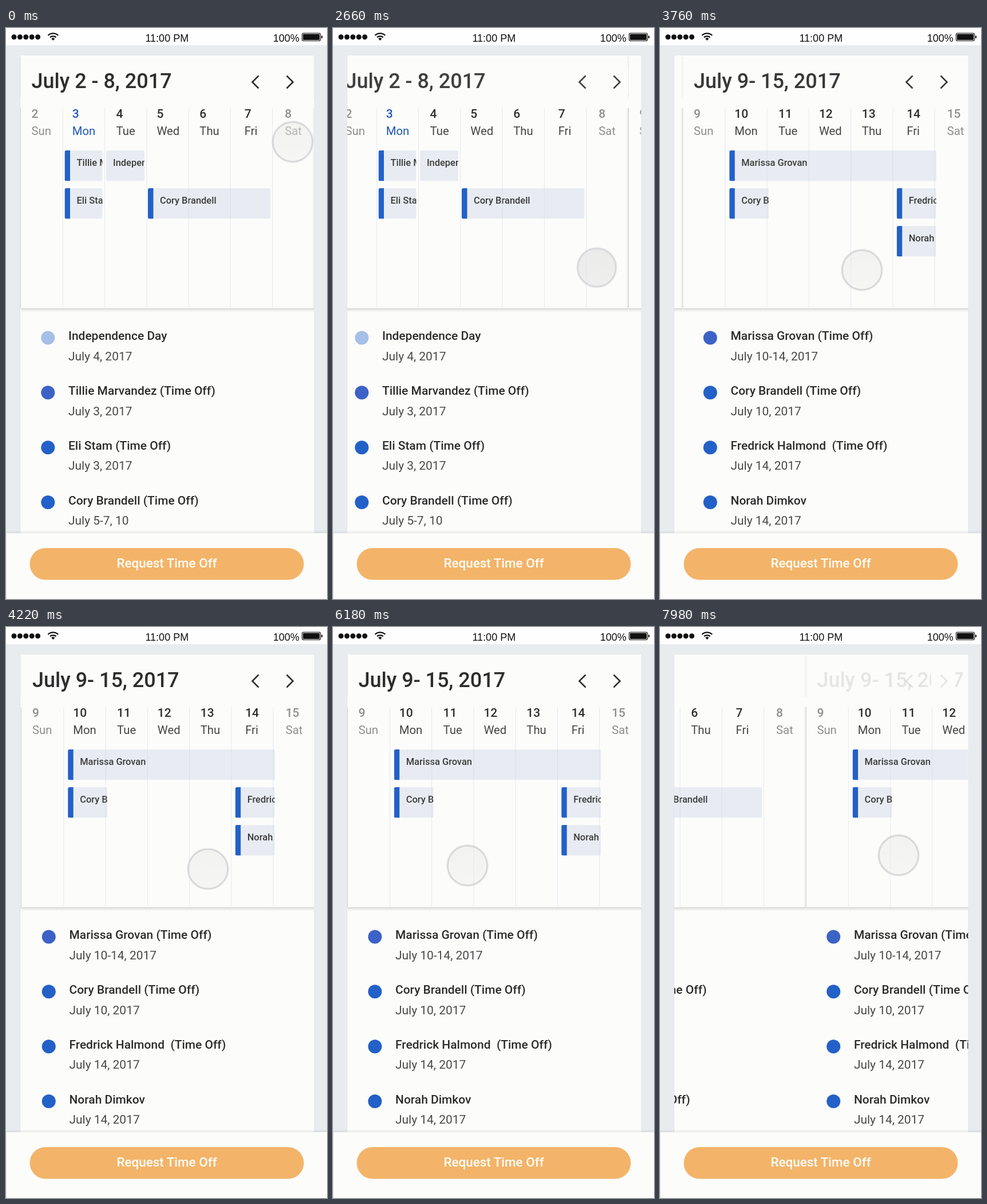
An HTML page for the animation above (8 s loop, 561 px wide and 998 px high).

```html
<!DOCTYPE html>
<html lang="en">
<head>
<meta charset="utf-8">
<title>Time off calendar</title>
<style>
  html, body { margin: 0; width: 100%; height: 100%; overflow: hidden; background: #e9ecee; }
  svg { display: block; width: 100%; height: 100%; }
  text { font-family: Roboto, sans-serif; white-space: pre; }
  .medium { font-weight: 500; }
  .status { font: 18px "Liberation Sans", sans-serif; fill: #111; }
</style>
</head>
<body>
<svg id="stage" viewBox="0 0 561 998" xmlns="http://www.w3.org/2000/svg"></svg>
<script>
const LOOP = 8000, PAGE = 514, SLACK = 20, FADE = 257, GLIDE = 224;
const BLUE = '#2360c8', PAPER = '#fcfcfb', INK = '#2d2d2d';

const dayNames = ['Sun', 'Mon', 'Tue', 'Wed', 'Thu', 'Fri', 'Sat'];
const dayX = [44.5, 115.8, 192.6, 263.4, 338.3, 416.7, 487.2];

// bars: x, width, row, label, striped; list: name, date, dot colour
const weeks = [
  {
    title: 'July 2 - 8, 2017', first: 2, today: 1,
    bars: [
      [102.5, 66, 0, 'Tillie Marvandez', true],
      [175, 67, 0, 'Independence Day', false],
      [102.5, 66, 1, 'Eli Stam', true],
      [248, 214.5, 1, 'Cory Brandell', true]
    ],
    list: [
      ['Independence Day', 'July 4, 2017', '#a6bfe6'],
      ['Tillie Marvandez (Time Off)', 'July 3, 2017', '#3d62c6'],
      ['Eli Stam (Time Off)', 'July 3, 2017', BLUE],
      ['Cory Brandell (Time Off)', 'July 5-7, 10', BLUE]
    ]
  },
  {
    title: 'July 9- 15, 2017', first: 9, today: -1,
    bars: [
      [106.7, 362, 0, 'Marissa Grovan', true],
      [106.7, 69, 1, 'Cory Brandell', true],
      [399.2, 69, 1, 'Fredrick Halmond', true],
      [399.2, 69, 2, 'Norah Dimkov', true]
    ],
    list: [
      ['Marissa Grovan (Time Off)', 'July 10-14, 2017', '#3d62c6'],
      ['Cory Brandell (Time Off)', 'July 10, 2017', BLUE],
      ['Fredrick Halmond  (Time Off)', 'July 14, 2017', BLUE],
      ['Norah Dimkov', 'July 14, 2017', BLUE]
    ]
  }
];

const rect = (x, y, w, h, fill, extra = '') =>
  `<rect x="${x}" y="${y}" width="${w}" height="${h}" fill="${fill}" ${extra}/>`;
const label = (x, y, size, fill, str, extra = '') =>
  `<text x="${x}" y="${y}" font-size="${size}" fill="${fill}" ${extra}>${str}</text>`;
const medium = 'class="medium"';

function dayHead(week, i) {
  const weekend = i % 6 === 0, today = i === week.today;
  const pick = normal => today ? '#2058b8' : weekend ? '#8e8e8e' : normal;
  return label(dayX[i], 157, 21, pick(INK), week.first + i, medium) +
    label(dayX[i], 187, 20.3, pick('#454545'), dayNames[i]);
}

function bar([x, w, row, name, striped], id) {
  const y = 214 + row * 66;
  return `<clipPath id="${id}">${rect(x, y, w, 53.5, '#000', 'rx="3"')}</clipPath>
    <g clip-path="url(#${id})">${rect(x, y, w, 53.5, '#e8ecf2')}
    ${striped ? rect(x, y, 9.5, 53.5, BLUE) : ''}
    ${label(x + (striped ? 21 : 12), y + 27.3, 16.45, '#3b3b3b', name, medium)}</g>`;
}

function entry([name, date, color], i) {
  const y = 541.5 + i * 95.85;
  return `<circle cx="73.3" cy="${y}" r="12" fill="${color}"/>` +
    label(109, y + 3.6, 20.95, '#2b2b2b', name, medium) +
    label(109, y + 39.2, 20.95, '#484848', date);
}

function page(week, n) {
  const lines = [1, 2, 3, 4, 5, 6].map(i =>
    rect(25.6 + i * 73.25, 140, 1, 349, '#c3cce2', 'opacity=".4"')).join('');
  return `<g id="page${n}">
    ${rect(21, 50, 5, 72, 'url(#side)', 'opacity=".4"')}
    ${rect(21, 140, 5, 350, 'url(#side)')}
    ${rect(26, 48, 513, 442, PAPER)}
    ${rect(26, 490, 513, 7, 'url(#under)')}
    ${label(44.5, 105, 36, INK, week.title, `${medium} id="title${n}"`)}
    ${week.bars.map((b, i) => bar(b, `bar${n}${i}`)).join('')}
    ${lines}
    ${dayNames.map((_, i) => dayHead(week, i)).join('')}
    ${week.list.map(entry).join('')}
  </g>`;
}

function fade(id, vertical, stops) {
  return `<linearGradient id="${id}" ${vertical ? 'x2="0" y2="1"' : ''}>` +
    stops.map(([at, color, a]) =>
      `<stop offset="${at}" stop-color="${color}" stop-opacity="${a}"/>`).join('') +
    '</linearGradient>';
}

const signal = [0, 1, 2, 3, 4].map(i =>
  `<circle cx="${14 + i * 10.4}" cy="15.8" r="4.5"/>`).join('');

const stage = document.getElementById('stage');
stage.innerHTML = `
  <defs>
    ${fade('side', false, [[0, '#000', 0], [.6, '#000', .05], [1, '#000', .2]])}
    ${fade('under', true, [[0, '#000', .19], [.35, '#000', .07], [1, '#000', 0]])}
    ${fade('lift', true, [[0, '#556', 0], [1, '#556', .12]])}
    ${fade('knob', true, [[0, '#e6e6e4', .45], [1, '#eeeeec', .45]])}
    <clipPath id="card">${rect(25, 48, 513.5, 836, '#000')}</clipPath>
  </defs>
  ${rect(0, 0, 561, 998, '#e9ecee')}
  ${rect(0, 0, 561, 30, '#fefefe')}
  <g fill="#111">${signal}
    <path d="M82.3 22l-3-3.3a4.4 4.4 0 0 1 6 0z"/>
    <g fill="none" stroke="#111" stroke-width="2.3">
      <path d="M77 16.4a8 8 0 0 1 10.6 0M73.4 12.9a13 13 0 0 1 17.8 0"/>
    </g>
    ${rect(517.5, 9, 32, 13.5, 'none', 'rx="2.5" stroke="#111" stroke-width="1.2"')}
    ${rect(519, 10.5, 29, 10.5, '#111', 'rx="1.2"')}
    <path d="M551 13q2.4 .6 2.4 2.8t-2.4 2.8z"/>
  </g>
  <text class="status" x="281.3" y="24" text-anchor="middle">11:00 PM</text>
  <text class="status" x="512.8" y="24" text-anchor="end">100%</text>
  ${rect(24.5, 47.5, 514.5, 840, PAPER, 'stroke="#e3e6ea"')}
  <g clip-path="url(#card)">
    ${weeks.map(page).join('')}
    ${rect(474, 71, 42, 44, PAPER)}
    <path id="arrows" d="M441.5 83.5L430.5 94.5L441.5 105.5M490.5 83.5L501.5 94.5L490.5 105.5"
      fill="none" stroke="${INK}" stroke-width="2.6"/>
  </g>
  ${rect(0, 878, 561, 5, 'url(#lift)')}
  ${rect(0, 883, 561, 115, PAPER)}
  ${rect(0, 883, 1, 115, '#e3e5e9')}
  ${rect(41.5, 909, 479, 55.5, '#f3b469', 'rx="27.7"')}
  ${label(281, 943, 22.44, '#fffdf8', 'Request Time Off', `${medium} text-anchor="middle"`)}
  <g id="touch">
    <circle r="35.4" fill="none" stroke="#667" stroke-opacity=".12" stroke-width="3"/>
    <circle r="34.3" fill="url(#knob)" stroke="#d6d6d9" stroke-width="2.2"/>
    <circle id="shade" r="33" fill="#99a"/>
  </g>`;

const $ = id => document.getElementById(id);
const clamp = v => Math.max(0, Math.min(1, v));
const ease = p => (1 - Math.cos(Math.PI * clamp(p))) / 2;
const mix = (a, b, p) => a + (b - a) * p;

// Finger moves: start, end, target x, target y
const moves = [
  [0, 800, 504, 417],
  [2470, 3000, 353, 423],
  [5000, 5760, 235, 417],
  [7440, 7932, 417, 399]
];
const drags = [moves[1], moves[3]];

function finger(t) {
  return moves.reduce(([x, y], [a, b, tx, ty]) => {
    const p = ease((t - a) / (b - a));
    return [mix(x, tx, p), mix(y, ty, p)];
  }, [501, 199]);
}

// The page follows the finger past a small slack, then glides to the next stop
function scroll(t) {
  const i = t >= drags[1][0] ? 1 : t >= drags[0][0] ? 0 : -1;
  if (i < 0) return 0;
  const [start, end] = drags[i];
  const from = i ? -PAGE : 0, to = -PAGE - from;
  const dx = finger(Math.min(t, end))[0] - finger(start)[0];
  const held = from + Math.sign(dx) * Math.max(0, Math.abs(dx) - SLACK);
  return t < end ? held : to + (held - to) * Math.exp((end - t) / GLIDE);
}

// Three even steps per 140 ms, shown for 20, 100 and 20 ms
function stepTime(t) {
  const phase = t % 140;
  const step = phase < 20 ? 0 : phase < 120 ? 1 : 2;
  return t - phase + step * 140 / 3;
}

function draw(time) {
  const t = stepTime(time), s = scroll(t);
  let strongest = 0;
  weeks.forEach((_, n) => {
    const x = s + n * PAGE, alpha = clamp(1 - Math.abs(x) / FADE);
    strongest = Math.max(strongest, alpha);
    $('page' + n).setAttribute('transform', `translate(${x.toFixed(2)} 0)`);
    $('title' + n).setAttribute('opacity', alpha);
  });
  $('arrows').setAttribute('opacity', strongest);

  const [x, y] = finger(t);
  const press = Math.max(...drags.map(([a, b]) =>
    Math.min(clamp((t - a + 60) / 120), clamp((b - t) / 100))));
  $('touch').setAttribute('transform', `translate(${x} ${y}) scale(${1 - .035 * press})`);
  $('shade').setAttribute('opacity', .08 * press);
}

const begin = performance.now();
function tick() {
  draw((performance.now() - begin) % LOOP);
  requestAnimationFrame(tick);
}
draw(0);
requestAnimationFrame(tick);
</script>
</body>
</html>
```
